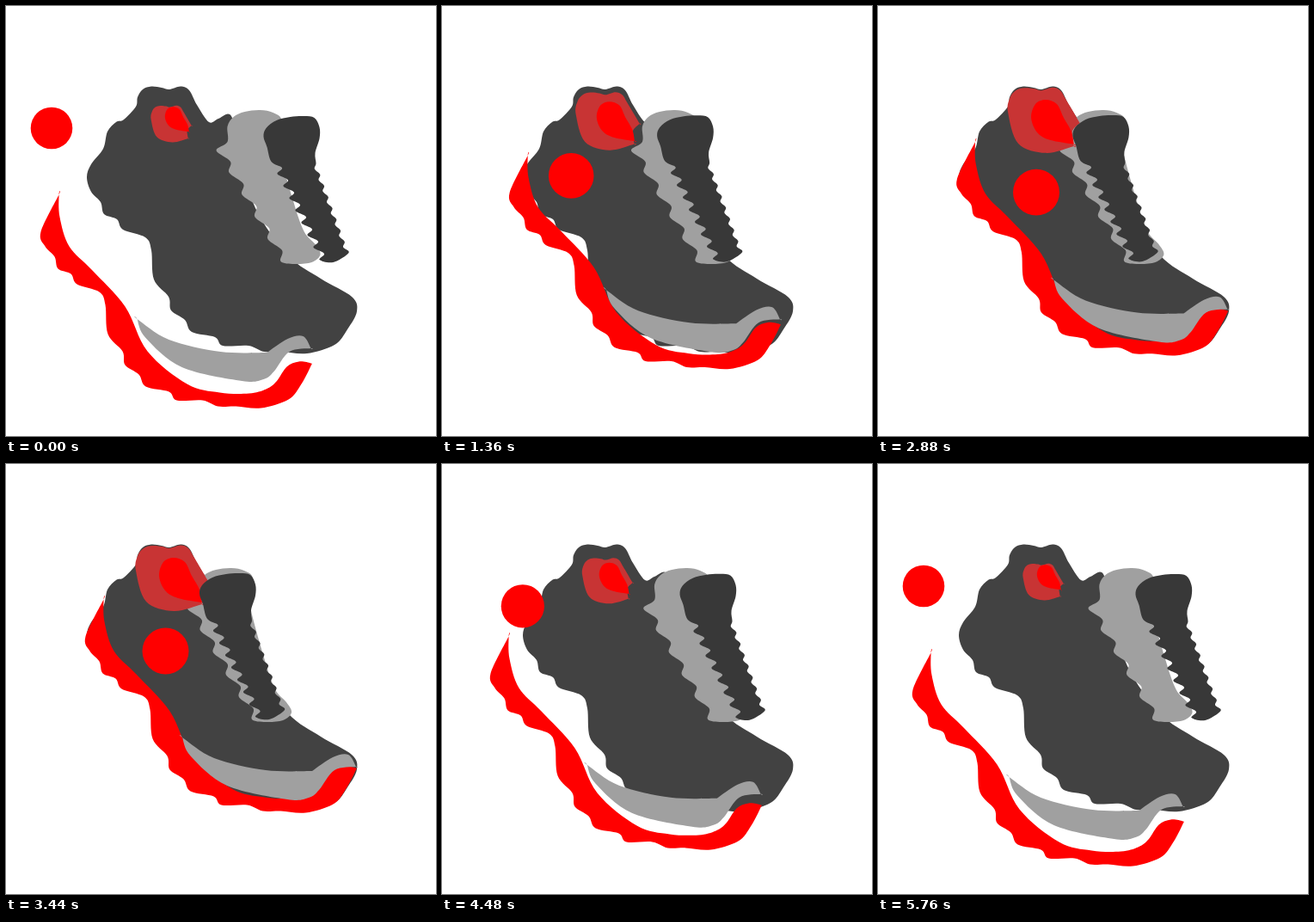
Write an HTML page with a canvas that moves like this. It is 500 by 500 pixels and loops after 5840 ms.

```html
<!DOCTYPE html>
<html lang="en">
<head>
<meta charset="utf-8">
<title>Running shoe</title>
<style>
html, body { margin: 0; width: 100%; height: 100%; overflow: hidden; background: #fff; }
canvas { display: block; width: 100vmin; height: 100vmin; }
</style>
</head>
<body>
<canvas id="stage" width="500" height="500"></canvas>
<script>
const ctx = document.getElementById('stage').getContext('2d');
const LOOP = 5840, STEP = 80;
const RED = '#ff0000', DARK = '#424242', LACE = '#383838', GREY = '#a0a0a0', WINE = '#c83434';

const points = text => text.trim().split(/\s+/).map(s => s.split(',').map(Number));

// Scalloped line: every second point is pushed sideways by depth.
function scallops(x0, y0, x1, y1, count, depth) {
  return Array.from({ length: 2 * count + 1 }, (_, i) => {
    const u = i / (2 * count);
    return [x0 + (x1 - x0) * u + (i % 2) * depth, y0 + (y1 - y0) * u];
  });
}

// Closed smooth curve through points; a repeated point makes a sharp corner.
function smooth(...runs) {
  const pts = runs.flat(), n = pts.length;
  const at = i => pts[(i + n) % n];
  const path = new Path2D();
  path.moveTo(...pts[0]);
  pts.forEach((b, i) => {
    const a = at(i - 1), c = at(i + 1), d = at(i + 2);
    path.bezierCurveTo(
      b[0] + (c[0] - a[0]) / 6, b[1] + (c[1] - a[1]) / 6,
      c[0] - (d[0] - b[0]) / 6, c[1] - (d[1] - b[1]) / 6, c[0], c[1]);
  });
  path.closePath();
  return path;
}

// Underside from heel to toe, shared by the upper and the sole.
const tread = points(`94,199 99,216 110,228 114,242 129,248 136,260 162,269 169,284
  172,318 189,338 192,354 208,365 216,379 243,385 252,395 282,395 300,402 321,402
  350,404 382,394 397,376 408,355`);

const upper = smooth(tread, points(`402,338 366,317 328,290 290,235 272,170 262,128
  247,131 236,135 222,115 213,98 203,93.5 190,97 181,95 169,93.5 159,97 153,106
  151,117 137,132 128,135 118,146 113,166 99,184`));

const sole = smooth(tread, points(`408,352 394,350 380,356 368,373 356,382 336,387
  302,386 264,376 218,338 192,286 153,243 127,216 116,182 115,156 115,156`));

const band = smooth(points(`205,318 205,318 242,342 302,356 356,357 356,357 380,341
  398,338 407,352 407,352 382,356 364,379 352,388 327,390 257,374 215,340`));

const eyelets = smooth(
  points('224,158 224,140 231,129 244,123 262,121 277,124 287,133 283,160'),
  points('300,225 313,262 326,277 332,289 322,298 302,300'),
  scallops(286, 297, 211, 168, 5, 9));

const tongue = smooth(
  points('225,151 228,141 240,132 256,128 272,127 284,129 290,140 290,153 285,170'),
  scallops(286, 182, 324, 286, 8, -4),
  points('306,297'),
  scallops(290, 294, 234, 180, 8, 9),
  points('229,163'));

const collar = smooth(points(`151,124 153,107 160,98 170,95 182,96 190,98 203,94.5
  212,98 219,109 235,136 235,136 226,146 228,163 228,163 195,171 163,160`));

const lining = smooth(points('178,130 183,114 195,109 208,114 216,130 225,146 228,161 228,161 200,156 185,147'));

const badge = new Path2D();
badge.arc(185.5, 217.5, 27, 0, 2 * Math.PI);

// Exponential ease-out from 0 to 1.
function ease(t, start, length) {
  const u = Math.min(1, Math.max(0, (t - start) / length));
  return (1 - Math.exp(-4 * u)) / (1 - Math.exp(-4));
}

// How far parts are pulled away: 1 is open, 0 is assembled.
const spread = (t, delay = 0) => 1 - ease(t, 500 + delay, 2700) + ease(t, 3980, 1760);

// Fills a part shifted by (dx, dy) and scaled about (cx, cy).
function part(path, color, dx = 0, dy = 0, scale = 1, cx = 0, cy = 0) {
  ctx.save();
  ctx.translate(cx + dx, cy + dy);
  ctx.scale(scale, scale);
  ctx.translate(-cx, -cy);
  ctx.fillStyle = color;
  ctx.fill(path);
  ctx.restore();
}

function draw(t) {
  const p = spread(t), q = spread(t, 150);
  const shrink = 1 - .44 * p;
  ctx.fillStyle = '#fff';
  ctx.fillRect(0, 0, 500, 500);
  part(upper, DARK);
  part(sole, RED, -1.5 - 52 * p, 1.5 + 62 * p);
  part(band, GREY, -52.5 * p, 46 * p);
  part(eyelets, GREY, 33.5 * p);
  part(collar, WINE, -p, 4 * p, shrink, 193.5, 133.5);
  part(lining, RED, 0, -2.5 * p, shrink, 193.5, 133.5);
  part(tongue, LACE, 74.5 * q, q);
  part(badge, RED, -132.5 * p, -75.5 * p, 1 - .1 * p, 185.5, 217.5);
}

const start = performance.now();
function frame() {
  const t = (performance.now() - start) % LOOP;
  draw(Math.floor(t / STEP) * STEP);
  requestAnimationFrame(frame);
}
frame();
</script>
</body>
</html>
```
